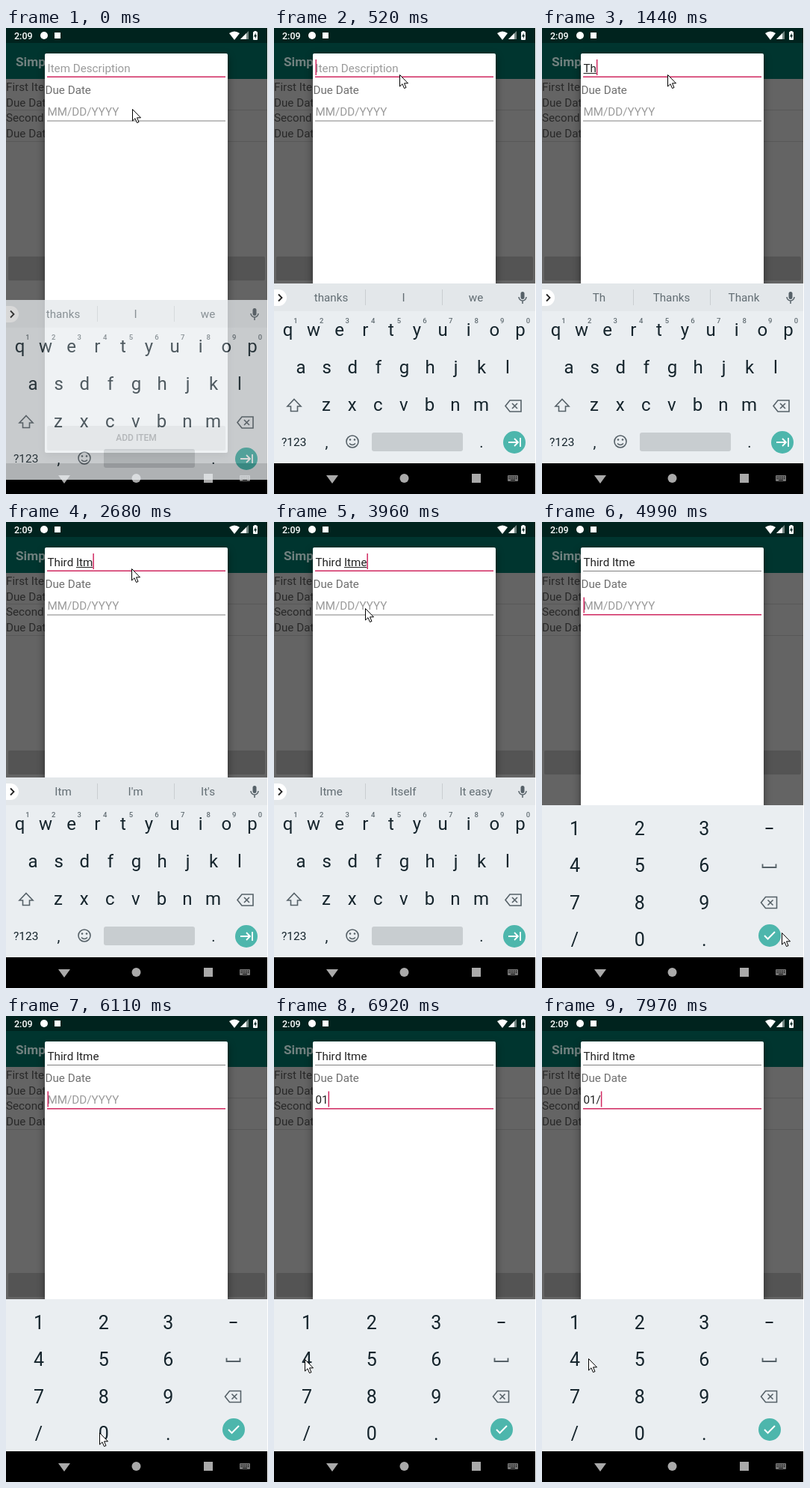
An HTML page with a canvas that plays this animation: 351x622 px, repeating every 8 s.

```html
<!DOCTYPE html>
<html lang="en">
<head>
<meta charset="utf-8">
<title>Add item dialog</title>
<style>
html, body { margin: 0; width: 100%; height: 100%; overflow: hidden; background: #fff; }
canvas { display: block; }
</style>
</head>
<body>
<canvas id="stage" width="351" height="622"></canvas>
<script>
const stage = document.getElementById('stage');
const screen = stage.getContext('2d');
const keyboard = stage.cloneNode().getContext('2d');
let ctx = screen;

const LOOP = 8000, WIDTH = 350, BODY = 15.2;
const INK = '#15242c', ICON = '#566168', PINK = '#d02860', TEAL = '#4db6ac';

// [time, item text, suggestions]
const typing = [
  [0, '', 'thanks', 'I', 'we'],
  [1320, 'T', 'T', 'The', 'To'],
  [1440, 'Th', 'Th', 'Thanks', 'Thank'],
  [1750, 'Thi', 'Thi', 'This', 'Think'],
  [2050, 'Thir', 'Thir', 'Third', 'Thirty'],
  [2200, 'Third', 'Third', 'Thirds', 'Thirdly'],
  [2350, 'Third I', 'I', "I'm", 'It'],
  [2530, 'Third It', 'It', "It's", 'Its'],
  [2680, 'Third Itm', 'Itm', "I'm", "It's"],
  [2830, 'Third Itme', 'Itme', 'Itself', 'It easy']
];
const dates = [[0, ''], [6260, '0'], [6800, '01'], [7450, '01/']];
const caret = [[0, false], [520, true], [910, false], [1320, true], [3260, false],
  [3780, true], [4230, false], [4710, true], [5520, false], [5960, true]];

// [time, x, y] of the pointer tip
const pointer = [
  [0, 169, 108], [119, 169, 108], [240, 169, 66], [520, 168, 62], [3540, 168, 62],
  [3810, 128, 106], [3950, 122, 115], [4090, 122, 115], [4560, 321, 547],
  [5140, 321, 548], [5700, 150, 550], [5960, 125, 556], [6270, 125, 556],
  [6700, 42, 405], [6850, 42, 405], [7100, 40, 590], [7300, 40, 560],
  [7500, 40, 560], [7930, 62, 457], [8000, 62, 457]
];

const current = (list, t) => list.findLast(entry => entry[0] <= t);

function pointerAt(t) {
  const i = pointer.findIndex(key => key[0] > t);
  const [t0, x0, y0] = pointer[i - 1], [t1, x1, y1] = pointer[i];
  const k = (t - t0) / (t1 - t0);
  return [Math.round(x0 + (x1 - x0) * k), Math.round(y0 + (y1 - y0) * k)];
}

function rect(x, y, w, h, color, radius = 0) {
  ctx.fillStyle = color;
  ctx.beginPath();
  ctx.roundRect(x, y, w, h, radius);
  ctx.fill();
}
function circle(x, y, r, color) {
  ctx.fillStyle = color;
  ctx.beginPath();
  ctx.arc(x, y, r, 0, 7);
  ctx.fill();
}
function text(str, x, y, size, color, align = 'left', weight = 400) {
  ctx.font = `${weight} ${size}px Roboto, sans-serif`;
  ctx.textAlign = align;
  ctx.fillStyle = color;
  ctx.fillText(str, x, y);
}
function shape(x, y, d, fill, stroke, width = 1.6) {
  const path = new Path2D(d);
  ctx.save();
  ctx.translate(x, y);
  if (fill) { ctx.fillStyle = fill; ctx.fill(path); }
  if (stroke) { ctx.strokeStyle = stroke; ctx.lineWidth = width; ctx.stroke(path); }
  ctx.restore();
}

function drawScreen(buttonY) {
  rect(0, 0, WIDTH, 622, '#646464');
  rect(0, 20, WIDTH, 48, '#00352f');
  rect(0, 0, WIDTH, 20, '#00231e');
  text('Simple Todo', 13, 50.5, 17.3, '#71817f', 'left', 700);
  ['First Item', 'Due Date', 'Second Item', 'Due Date'].forEach((row, i) =>
    text(row, 0, 84 + 20.7 * i, BODY, '#292929'));
  rect(0, 109, WIDTH, 1, '#585858');
  rect(0, 151, WIDTH, 1, '#585858');
  rect(3, buttonY, 344, 32, '#545454', 2);
}

function drawStatus() {
  text('2:09', 11, 14.5, 12.5, '#fff', 'left', 500);
  circle(51, 10, 5, '#fff');
  rect(65, 6, 8, 8, '#fff');
  shape(306, 10, 'M-7-3Q0-8 7-3L0 6Z', '#fff');
  shape(320, 10, 'M5-6V5H-6Z', '#758783');
  shape(320, 10, 'M2-3V5H-6Z', '#fff');
  rect(331, 5, 6, 11, '#fff', 1);
  rect(332.5, 4, 3, 2, '#fff');
  shape(334, 10.5, 'M.5-4L-2 1H0V4L2-1H.5Z', '#00231e');
}

function drawNav() {
  rect(0, 581, WIDTH, 41, '#000');
  shape(78, 602, 'M-8-5H8L0 6Z', '#aaa');
  circle(174.5, 601, 6, '#aaa');
  rect(265, 595, 12, 12, '#aaa');
  rect(313, 597, 14, 8, '#777', 1);
  for (let i = 0; i < 5; i++) {
    rect(314.5 + i * 2.4, 598.5, 1.2, 1.2, '#000');
    rect(314.5 + i * 2.4, 600.7, 1.2, 1.2, '#000');
  }
  rect(317, 603, 6, 1, '#000');
}

function drawField(value, hint, y, focused, showCaret, underlined) {
  text(value || hint, 55.5, y + 5.5, BODY, value ? '#222' : '#9b9b9b');
  const width = ctx.measureText(value).width;
  if (underlined && value) {
    const start = ctx.measureText(value.slice(0, value.lastIndexOf(' ') + 1)).width;
    rect(55.5 + start, y + 7, width - start, 1, '#222');
  }
  if (focused) rect(55, y + 11.5, 239, 1.5, PINK);
  else rect(55, y + 12, 239, 1, '#808080');
  if (focused && showCaret) rect(55.5 + width, y - 11, 1.5, 21, PINK);
}

function drawDialog(t, item, date) {
  const onDate = t >= 4990, visible = current(caret, t)[1];
  ctx.save();
  ctx.shadowColor = 'rgba(0,0,0,.45)';
  ctx.shadowBlur = 11;
  ctx.shadowOffsetY = 4;
  rect(52, 34, 245, 533, '#fff', 2);
  ctx.restore();
  drawField(item, 'Item Description', 53, !onDate, visible, !onDate);
  text('Due Date', 52.5, 88, BODY, '#6f6f6f');
  drawField(date, 'MM/DD/YYYY', 111.5, onDate, visible, false);
  rect(55, 531, 239, 33, '#d2d4d4', 2);
  text('ADD ITEM', 174.5, 551, 12, '#111', 'center', 500);
}

function drawBackspace(x, y) {
  shape(x, y, 'M-11 0L-5-7.5H10V7.5H-5ZM-2-3.5L5 3.5M5-3.5L-2 3.5', null, ICON);
}

function drawLetters(suggestions, upper, pressed) {
  rect(0, 341, WIDTH, 240, '#eaeef1');
  rect(0, 341, WIDTH, 37, '#e3e7ea');
  rect(-12, 349, 29, 22, '#fff', 11);
  shape(8, 360, 'M-2-4.5L2.5 0L-2 4.5', null, '#222', 1.8);
  suggestions.forEach((word, i) =>
    text(word, 76.5 + i * 97, 365, BODY, '#626d73', 'center'));
  rect(122, 349, 1, 21, '#c9ced1');
  rect(225, 349, 1, 21, '#c9ced1');
  rect(330.5, 352, 5, 10, ICON, 2.5);
  shape(333, 360, 'M-5-1A5 5 0 0 0 5-1M0 4V8', null, ICON, 1.5);

  [['qwertyuiop', 18.5, 411], ['asdfghjkl', 36, 461], ['zxcvbnm', 70, 511]].forEach(([keys, x, y]) =>
    [...keys].forEach((key, i) =>
      text(upper ? key.toUpperCase() : key, x + 34.6 * i, y, 24, INK, 'center')));
  [...'1234567890'].forEach((digit, i) =>
    text(digit, 29 + 34.6 * i, 394, 9.5, '#626d73', 'center', 500));

  shape(27, 504, 'M0-8.5L9 1H4.5V7.5H-4.5V1H-9Z', upper ? ICON : null, ICON);
  drawBackspace(321, 504.5);
  text('?123', 10, 558, 15.5, INK);
  text(',', 70.5, 560, 20, INK, 'center');
  shape(105, 552, 'M8 0A8 8 0 1 1-8 0A8 8 0 1 1 8 0M-4 2.5Q0 6.5 4 2.5', null, ICON);
  circle(102, 549.5, 1.3, ICON);
  circle(108, 549.5, 1.3, ICON);
  rect(131, 540, 122, 25, '#c8cdd0', 3);
  text('.', 278, 560, 20, INK, 'center');
  circle(322, 553, 15, pressed ? '#45a59c' : TEAL);
  shape(322, 553, 'M-8 0H4M0-5L5 0L0 5M8-6V6', null, '#fff', 1.8);
}

function drawNumbers() {
  rect(0, 378, WIDTH, 203, '#eaeef1');
  ['123', '456', '789', '/0.'].forEach((row, r) =>
    [...row].forEach((key, c) =>
      text(key, 44 + 86.7 * c, 418 + 49.3 * r, 25, INK, 'center')));
  rect(299.5, 408, 10, 2, INK);
  shape(304.5, 459, 'M-9-2.5V2H9V-2.5', null, ICON, 1.8);
  drawBackspace(304.5, 508);
  circle(305, 552, 15, TEAL);
  shape(305, 552, 'M-7 0L-2.5 4.5L7-5', null, '#fff', 2);
}

// Painted on its own layer so that it fades in as one surface.
function drawKeyboard(t, suggestions) {
  const [shift, alpha] = t < 120 ? [22, 0.75] : t < 240 ? [6, 0.93] : [0, 1];
  ctx = keyboard;
  ctx.clearRect(0, 0, 351, 622);
  if (t < 4990) drawLetters(suggestions, t >= 1320 && t < 1440, t >= 4560 && t < 4710);
  else drawNumbers();
  ctx = screen;
  ctx.globalAlpha = alpha;
  ctx.drawImage(keyboard.canvas, 0, shift);
  ctx.globalAlpha = 1;
}

function draw(now) {
  const t = now % LOOP;
  const [, item, ...suggestions] = current(typing, t);
  ctx.clearRect(0, 0, 351, 622);
  ctx.save();
  ctx.beginPath();
  ctx.rect(0, 0, WIDTH, 622);
  ctx.clip();
  drawScreen(t < 5250 ? 305 : 343);
  drawStatus();
  drawDialog(t, item, current(dates, t)[1]);
  drawNav();
  drawKeyboard(t, suggestions);
  shape(...pointerAt(t), 'M.5.5V16L4 12.7L6.5 18.5L9 17.5L6.5 11.8H11.5Z', '#fff', '#000', 1);
  ctx.restore();
}

const start = performance.now();
function frame() {
  draw(performance.now() - start);
  requestAnimationFrame(frame);
}
frame();
</script>
</body>
</html>
```
